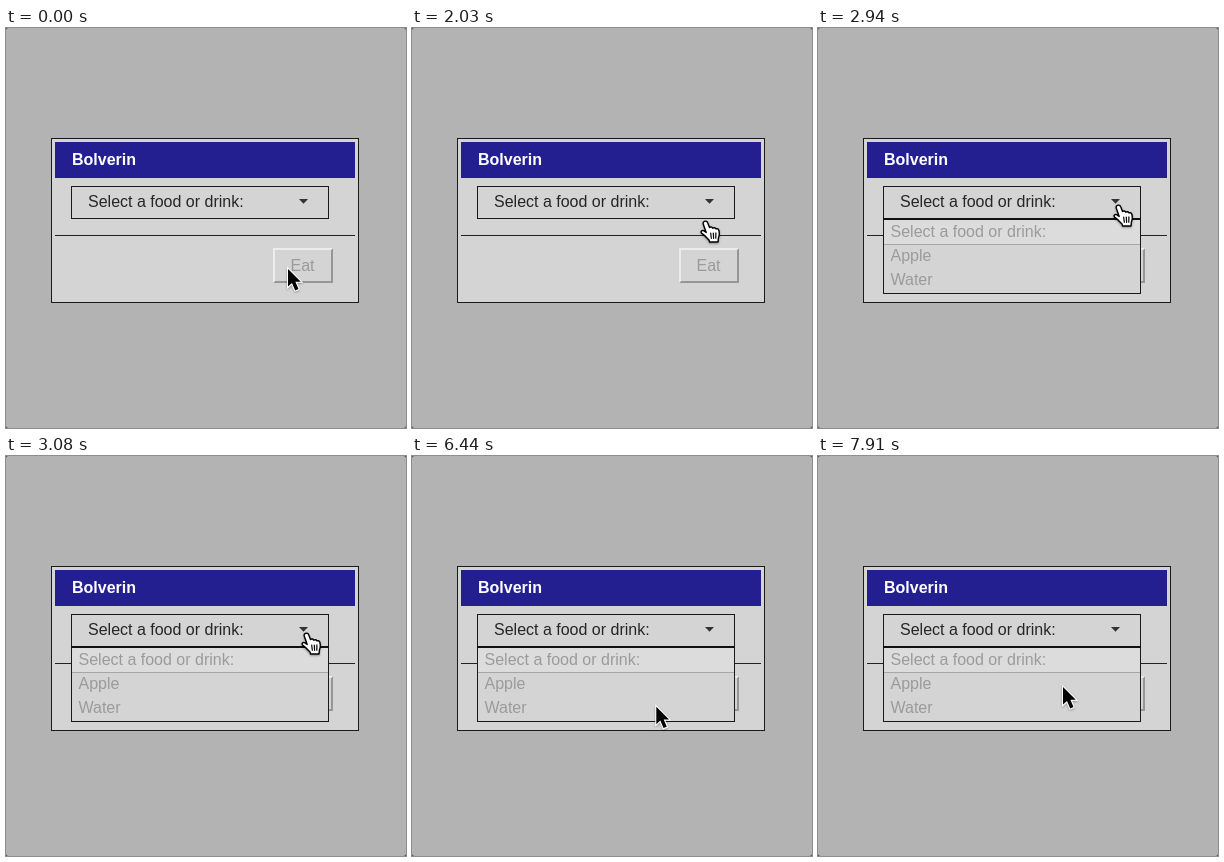
An HTML page that plays this animation: 400 px wide and 400 px high, repeating every 8 s.

```html
<!DOCTYPE html>
<html lang="en">
<head>
<meta charset="utf-8">
<title>Food picker</title>
<style>
  html, body { margin: 0; width: 100%; height: 100%; overflow: hidden; background: #b3b3b3; }
  svg { display: block; width: 100vw; height: 100vh; }
  text { font: 16px "Liberation Sans", Arial, sans-serif; }
  .title { font-weight: bold; fill: #fff; }
  .label { fill: #262626; }
  .off { fill: #9b9b9b; }
  .frame { fill: #d4d4d4; stroke: #1a1a1a; }
</style>
</head>
<body>
<svg viewBox="0 0 400 400">
  <defs>
    <filter id="shadow" x="-50%" y="-50%" width="200%" height="200%">
      <feDropShadow dx="0" dy="1" stdDeviation="0.9" flood-opacity="0.35"/>
    </filter>
  </defs>
  <rect width="400" height="400" fill="#555"/>
  <rect width="400" height="400" rx="3" fill="#b3b3b3"/>

  <rect class="frame" x="45.5" y="110.5" width="307" height="164"/>
  <rect x="49" y="114" width="300" height="36" fill="#231f91"/>
  <text class="title" x="66" y="137">Bolverin</text>
  <path d="M49 207.5H349" stroke="#222"/>

  <g id="button">
    <rect x="267" y="220" width="60" height="35" fill="#d4d4d4"/>
    <path d="M327 220V255H267L269 253H325V222Z" fill="#969696"/>
    <path d="M267 255V220H327L325 222H269V253Z" fill="#ececec"/>
    <text class="off" x="284.5" y="243">Eat</text>
  </g>

  <rect class="frame" x="65.5" y="158.5" width="257" height="32"/>
  <text class="label" x="82" y="179">Select a food or drink:</text>
  <path d="M293 171H302L297.5 175.7Z" fill="#333"/>

  <g id="list">
    <rect class="frame" x="65.5" y="190.5" width="257" height="75"/>
    <rect x="66" y="192" width="256" height="24" fill="#dcdcdc"/>
    <path d="M66 216.5H322" stroke="#a6a6a6"/>
    <path d="M65 191H323" stroke="#111" stroke-width="2"/>
    <text class="off" x="72.5" y="209">Select a food or drink:</text>
    <text class="off" x="72.5" y="233">Apple</text>
    <text class="off" x="72.5" y="257">Water</text>
  </g>

  <g id="arrow" filter="url(#shadow)">
    <path d="M0 0V17.6L4 13.9L7.2 21.4L10.5 20L7.4 12.7H12.8Z" fill="#000" stroke="#fff" stroke-width="2" paint-order="stroke"/>
  </g>
  <g id="hand" filter="url(#shadow)" stroke="#000" stroke-linejoin="round" stroke-linecap="round">
    <path d="M4.4 1.4C5.9 .7 7.3 1.4 7.8 2.9L9.5 7.6C10.6 6.6 12.1 6.9 12.7 8.2C13.9 7.3 15.3 7.7 15.9 8.9C17.3 8.3 18.5 9 18.9 10.5C19.6 13.1 19.4 15.6 18.4 18L18 22H9.6L9 20C7.2 18.2 4.6 15.2 1.9 13.4C.2 12 1.6 9.9 3.6 10.7L6.2 12.4L3.4 4.4C2.9 3.1 3.3 1.9 4.4 1.4Z" fill="#fff" stroke-width="1.4"/>
    <path d="M10.7 13L11.3 18.3M13.3 13L13.6 18.3M15.9 12.9L15.8 18.2" fill="none" stroke-width="1.2"/>
  </g>
</svg>
<script>
const LOOP = 8000, STEP = 70, OPEN_AT = 2940;
const byId = id => document.getElementById(id);
const list = byId('list'), cursors = { arrow: byId('arrow'), hand: byId('hand') };

// Each stroke: pointer shape, start, end, from x, y, to x, y
const strokes = [
  ['arrow', 0, 0, 282, 241, 282, 241],
  ['arrow', 1750, 1960, 282, 241, 287, 206],
  ['hand', 2030, 2590, 288, 192, 295, 176],
  ['hand', 5390, 5460, 295, 176, 280, 187],
  ['arrow', 5530, 5670, 266, 208, 248, 225],
  ['arrow', 6090, 6580, 248, 225, 244, 253],
  ['arrow', 6930, 7140, 244, 253, 244, 234],
  ['arrow', 7210, 7490, 244, 234, 243, 253],
  ['arrow', 7560, 7770, 243, 253, 244, 233],
  ['arrow', 7910, 7910, 245, 231, 245, 231],
];
const easeOut = p => 1 - (1 - p) ** 2;

function render(ms) {
  const t = Math.floor(ms / STEP) * STEP;
  const [shape, start, end, x0, y0, x1, y1] = strokes.findLast(s => t >= s[1]);
  const p = end > start ? easeOut(Math.min(1, (t - start) / (end - start))) : 1;
  const x = x0 + (x1 - x0) * p, y = y0 + (y1 - y0) * p;
  for (const [name, node] of Object.entries(cursors)) {
    node.setAttribute('visibility', name === shape ? 'visible' : 'hidden');
    node.setAttribute('transform', `translate(${x.toFixed(1)} ${y.toFixed(1)})`);
  }
  list.setAttribute('visibility', t >= OPEN_AT ? 'visible' : 'hidden');
}

const origin = performance.now();
function tick() {
  render((performance.now() - origin) % LOOP);
  requestAnimationFrame(tick);
}
tick();
</script>
</body>
</html>
```
